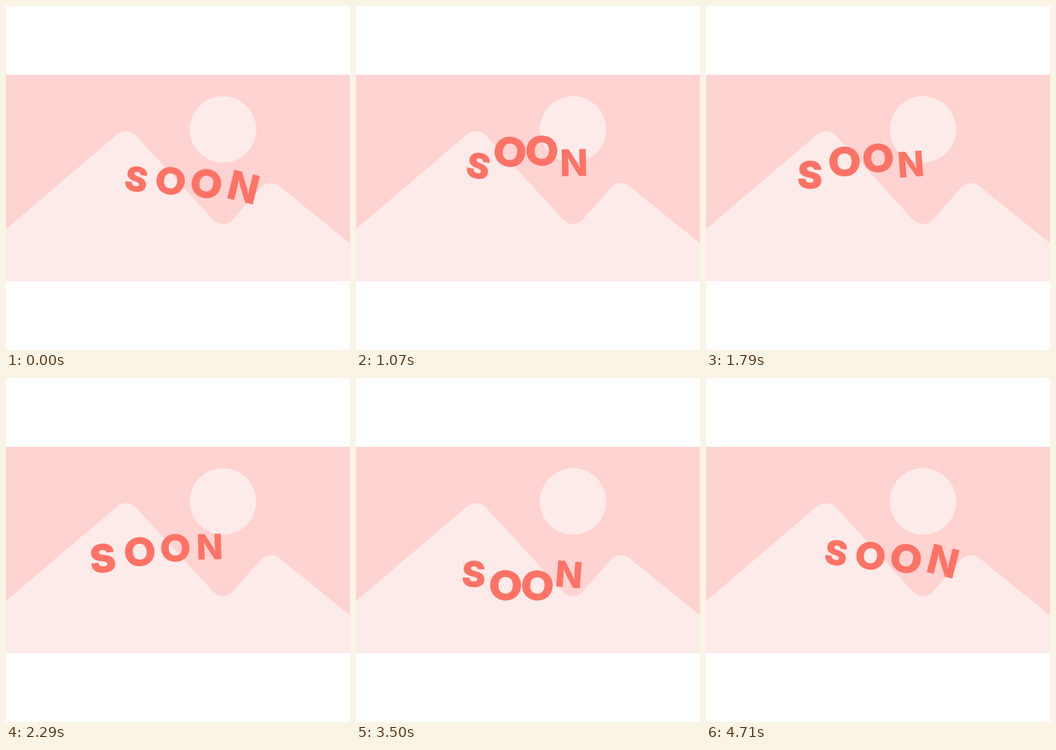
An HTML page with a canvas that plays this animation: 640 px wide and 640 px high, repeating every 4780 ms.

```html
<!DOCTYPE html>
<html lang="en">
<head>
<meta charset="utf-8">
<title>Soon</title>
<style>
  html, body { margin: 0; height: 100%; overflow: hidden; background: #fff; }
  canvas { display: block; }
</style>
</head>
<body>
<canvas id="stage" width="640" height="640" role="img" aria-label="SOON"></canvas>
<script>
const LOOP = 4780;
const STEP = LOOP / 67;
const SKY = '#ffd3d2', HILL = '#fdebe9', INK = '#ff7366';
const ctx = document.getElementById('stage').getContext('2d');

const ROUND = { font: '900 100px Lato, sans-serif', weight: 4 };
const WIDE = { font: '900 100px Inter, sans-serif', weight: 0 };
const SQUARE = { font: '800 100px Inter, sans-serif', weight: 0 };
const styles = { S: WIDE, O: ROUND, N: SQUARE };

// i is the letter's offset from the middle of the word, a the angle of the loop.
// Each letter circles its place; the middle of the word swings highest.
function pose(i, a) {
  const c = Math.cos(a), s = Math.sin(a);
  const c2 = Math.cos(2 * a), s2 = Math.sin(2 * a);
  const edge = i * i;
  return {
    x: 310.7 + 62.7 * i + (28.5 + 1.3 * edge) * c + 3.7 * i * c2 + 1.7 * s2,
    y: 327.6 + 0.8 * edge - i + 6 * i * c - (61.3 - 11.4 * edge + 2 * i) * s,
    size: 55.7 - 2.4 * edge + 2.4 * i * c + (1.3 * edge - 2.1) * c2,
    turn: 4 + 7.5 * c - 2.5 * i * s + 1.7 * i * c2
  };
}

function drawScene() {
  ctx.fillStyle = '#fff';
  ctx.fillRect(0, 0, 640, 640);
  ctx.fillStyle = SKY;
  ctx.fillRect(0, 128, 640, 384);
  ctx.fillStyle = HILL;
  ctx.beginPath();
  ctx.arc(403.7, 229.6, 61.8, 0, 2 * Math.PI);
  ctx.fill();
  ctx.beginPath();
  ctx.moveTo(0, 415);
  ctx.arcTo(225.4, 223, 404, 418, 26);
  ctx.arcTo(404, 418, 490, 320, 25);
  ctx.arcTo(490, 320, 640, 441.5, 25);
  ctx.lineTo(640, 441.5);
  ctx.lineTo(640, 512);
  ctx.lineTo(0, 512);
  ctx.fill();
}

function drawLetter(char, { x, y, size, turn }) {
  const { font, weight } = styles[char];
  ctx.save();
  ctx.font = font;
  const box = ctx.measureText(char);
  const top = box.actualBoundingBoxAscent, bottom = box.actualBoundingBoxDescent;
  const left = box.actualBoundingBoxLeft, right = box.actualBoundingBoxRight;
  const scale = size / (top + bottom + weight);
  const pen = [char, (left - right) / 2, (top - bottom) / 2];
  ctx.translate(x, y);
  ctx.rotate(turn * Math.PI / 180);
  ctx.scale(scale, scale);
  ctx.fillStyle = ctx.strokeStyle = INK;
  ctx.fillText(...pen);
  if (weight) {
    ctx.lineWidth = weight;
    ctx.strokeText(...pen);
  }
  ctx.restore();
}

function draw() {
  const ms = Math.floor((performance.now() % LOOP + 2) / STEP) * STEP;
  const angle = ms / LOOP * 2 * Math.PI;
  drawScene();
  [...'SOON'].forEach((char, n) => drawLetter(char, pose(n - 1.5, angle)));
  requestAnimationFrame(draw);
}
draw();
</script>
</body>
</html>
```
